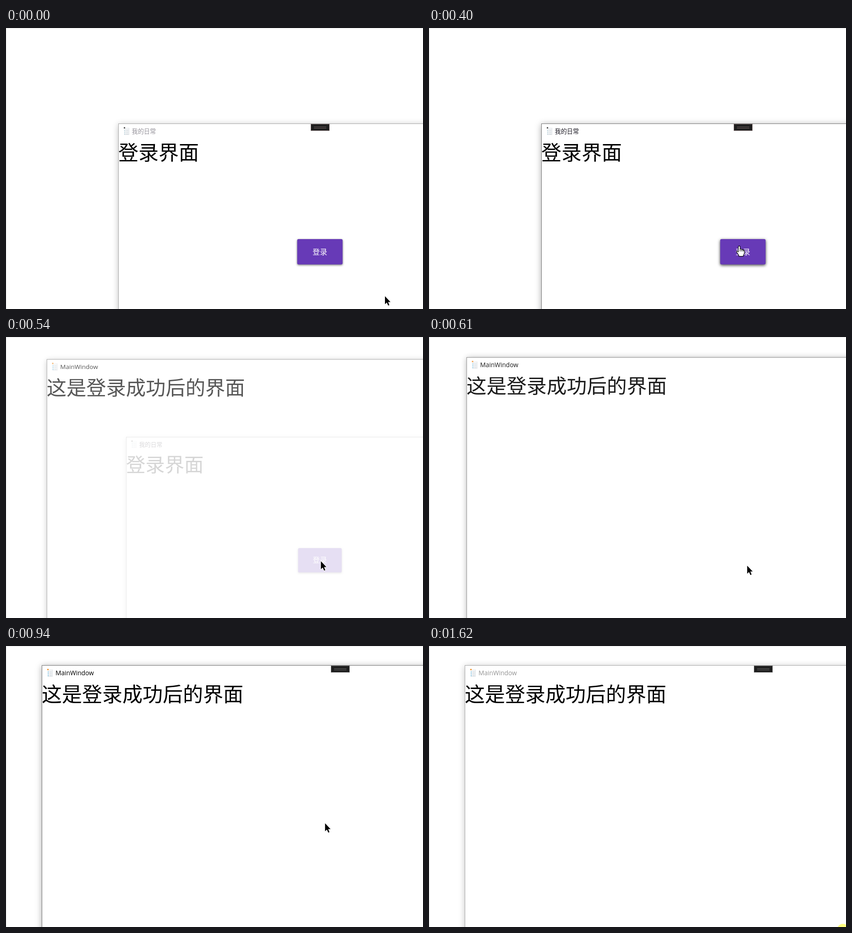
An HTML page with a canvas for the animation above (1.69 s loop, 910 px wide and 615 px high).

```html
<!DOCTYPE html>
<html lang="zh-CN">
<head>
<meta charset="utf-8">
<title>登录</title>
<style>
  html, body { margin: 0; width: 100%; height: 100%; overflow: hidden; background: #fff; }
  canvas { display: block; }
</style>
</head>
<body>
<canvas id="stage" width="910" height="615"></canvas>
<script>
const W = 910, H = 615, LOOP = 1690;
const STEP = 67.5;      // refresh interval of the picture, ms
const SUBMIT = 412;     // login starts to close
const OPEN = 445;       // main window starts to open
const BLUR = 1620;      // click elsewhere, main window loses focus
const HAN = '"Noto Sans CJK SC", "Noto Sans CJK", sans-serif';
const LATIN = '"Open Sans", "Noto Sans", sans-serif';

const stage = document.getElementById('stage').getContext('2d');
const layer = document.createElement('canvas');
layer.width = W;
layer.height = H;
const g = layer.getContext('2d');

const button = { x: 635.5, y: 462, w: 99, h: 55.5 };
const login = { x: 245, y: 209, w: 880, h: 504, body: loginBody };
const main = { x: 78, y: 42, w: 1302, h: 788, body: mainBody };

// Stops of the pointer: time, x, y.
const STOPS = [
  [0, 827, 587], [260, 677, 478], [480, 677, 477],
  [680, 697, 504], [940, 696, 388], [1080, 700, 387], [1220, 823, 519]
];

const progress = (t, start, length) => Math.min(Math.max((t - start) / length, 0), 1);
const easeOut = u => 1 - (1 - u) ** 2;

function pointerAt(t) {
  if (t >= BLUR) return [903, 620];
  const i = STOPS.findIndex(s => s[0] > t);
  if (i < 0) return STOPS.at(-1).slice(1);
  const [t0, x0, y0] = STOPS[i - 1], [t1, x1, y1] = STOPS[i];
  const u = easeOut(progress(t, t0, t1 - t0));
  return [x0 + (x1 - x0) * u, y0 + (y1 - y0) * u];
}

function isHovering(t) {
  const [x, y] = pointerAt(t);
  return t < SUBMIT && x > button.x && x < button.x + button.w
    && y > button.y && y < button.y + button.h;
}

function text(str, x, y, size, family, color) {
  g.font = `${size}px ${family}`;
  g.fillStyle = color;
  g.fillText(str, x, y);
}

function rect(c, x, y, w, h, color) {
  c.fillStyle = color;
  c.fillRect(x, y, w, h);
}

function outline(x, y, w, h, color) {
  g.strokeStyle = color;
  g.lineWidth = 1;
  g.strokeRect(x + 0.5, y + 0.5, w - 1, h - 1);
}

function shadow(alpha, blur, dy) {
  g.shadowColor = `rgba(0,0,0,${alpha})`;
  g.shadowBlur = blur;
  g.shadowOffsetY = dy;
}

function noteIcon(x, y, dot, bullet) {
  rect(g, x + 2, y + 1, 11, 16, '#f1f3f5');
  rect(g, x + 12, y + 2, 1, 15, '#dfe3e6');
  rect(g, x + 2, y + 16, 11, 1, '#dde1e4');
  rect(g, x + 1, y, 3, 3, dot);
  for (let row = y + 6; row < y + 16; row += 4) {
    rect(g, x + 2, row, 2, 2, bullet);
    rect(g, x + 6, row + 0.5, 5, 1, '#ccd3d8');
  }
}

function toolbar(x, y, line) {
  rect(g, x, y, 41, 15, '#1e1e1e');
  outline(x, y, 41, 15, line);
  for (const dy of [6, 9]) rect(g, x + 7, y + dy, 27, 1, line);
}

function frame({ x, y, w, h }, active) {
  g.save();
  shadow(active ? 0.34 : 0.24, 13, 2);
  rect(g, x, y, w, h, '#fff');
  g.restore();
  outline(x, y, w, h, active ? '#747474' : '#a6a6a6');
}

function heading(win, str) {
  text(str, win.x, win.y + 79.5, 44, HAN, '#000');
}

function loginBody(t) {
  const active = t >= 330, hover = isHovering(t);
  frame(login, active);
  noteIcon(256, 217, '#555', '#bcd3de');
  text('我的日常', 274.5, 231, 13.2, HAN, active ? '#1c1a24' : '#96939b');
  heading(login, '登录界面');
  if (t < SUBMIT) toolbar(665, 210, '#6b5c5c');
  g.save();
  shadow(hover ? 0.75 : 0.55, hover ? 6 : 4, hover ? 2 : 1.5);
  g.fillStyle = '#673ab7';
  g.beginPath();
  g.roundRect(button.x, button.y, button.w, button.h, 3);
  g.fill();
  g.restore();
  text('登录', 669, 495.5, 16, HAN, '#fff');
}

function mainBody(t) {
  const active = t < BLUR;
  frame(main, active);
  noteIcon(89, 50, '#f29a3c', '#7fc4e4');
  text('MainWindow', 108, 64, 13.75, LATIN, active ? '#000' : '#959595');
  if (t >= 540) heading(main, '这是登录成功后的界面');
  if (t >= 810) toolbar(709, 43, '#666');
}

// Draws a window whole, shrunk about its centre, then blends it in.
function drawWindow(win, t, alpha, shrink) {
  if (alpha <= 0) return;
  const s = 1 - shrink, cx = win.x + win.w / 2, cy = win.y + win.h / 2;
  g.setTransform(1, 0, 0, 1, 0, 0);
  g.clearRect(0, 0, W, H);
  g.setTransform(s, 0, 0, s, cx * shrink, cy * shrink);
  win.body(t);
  stage.globalAlpha = alpha;
  stage.drawImage(layer, 0, 0);
  stage.globalAlpha = 1;
}

const ARROW = new Path2D('M0 0V17.5L4 13.8L7 20.5L9.6 19.4L6.8 12.8H12Z');
const HAND = new Path2D('M-2 1.5Q-2 0 0 0Q2 0 2 1.5V7Q5 5.8 5.6 8Q8 6.8 8.8 9'
  + 'Q11.2 8.4 11.2 11V15Q11 18 9 20V22.5H-1V20L-5.4 13.6Q-6.4 11.4-4.6 11Q-3.2 11-2 13Z');

function drawPointer(t) {
  const [x, y] = pointerAt(t);
  stage.save();
  stage.translate(x, y);
  stage.lineJoin = 'round';
  if (t >= BLUR) {
    stage.fillStyle = '#ffff80';
    stage.beginPath();
    stage.arc(0, 0, 12, 0, Math.PI * 2);
    stage.fill();
  }
  if (isHovering(t)) {
    stage.fillStyle = '#fff';
    stage.strokeStyle = '#000';
    stage.lineWidth = 1.2;
    stage.fill(HAND);
    stage.stroke(HAND);
    stage.beginPath();
    for (const finger of [2, 5.6, 8.8]) {
      stage.moveTo(finger, 8);
      stage.lineTo(finger, 12);
    }
    stage.stroke();
  } else {
    stage.strokeStyle = '#fff';
    stage.lineWidth = 2;
    stage.stroke(ARROW);
    stage.fillStyle = '#000';
    stage.fill(ARROW);
  }
  stage.restore();
}

function draw() {
  const now = performance.now() % LOOP;
  const t = STEP * Math.floor((now + 10) / STEP);
  const closing = progress(t, SUBMIT, 152);
  const remaining = (1 - progress(t, OPEN, 320)) ** 3;

  rect(stage, 0, 0, W, H, '#fff');
  rect(stage, 0, 0, W, 1, '#e6e6e6');
  rect(stage, 0, 0, 1, H, '#e6e6e6');
  drawWindow(main, t, 1 - remaining, 0.0475 * remaining);
  drawWindow(login, t, 1 - closing, 0.046 * closing);
  drawPointer(t);
  requestAnimationFrame(draw);
}
draw();
</script>
</body>
</html>
```
